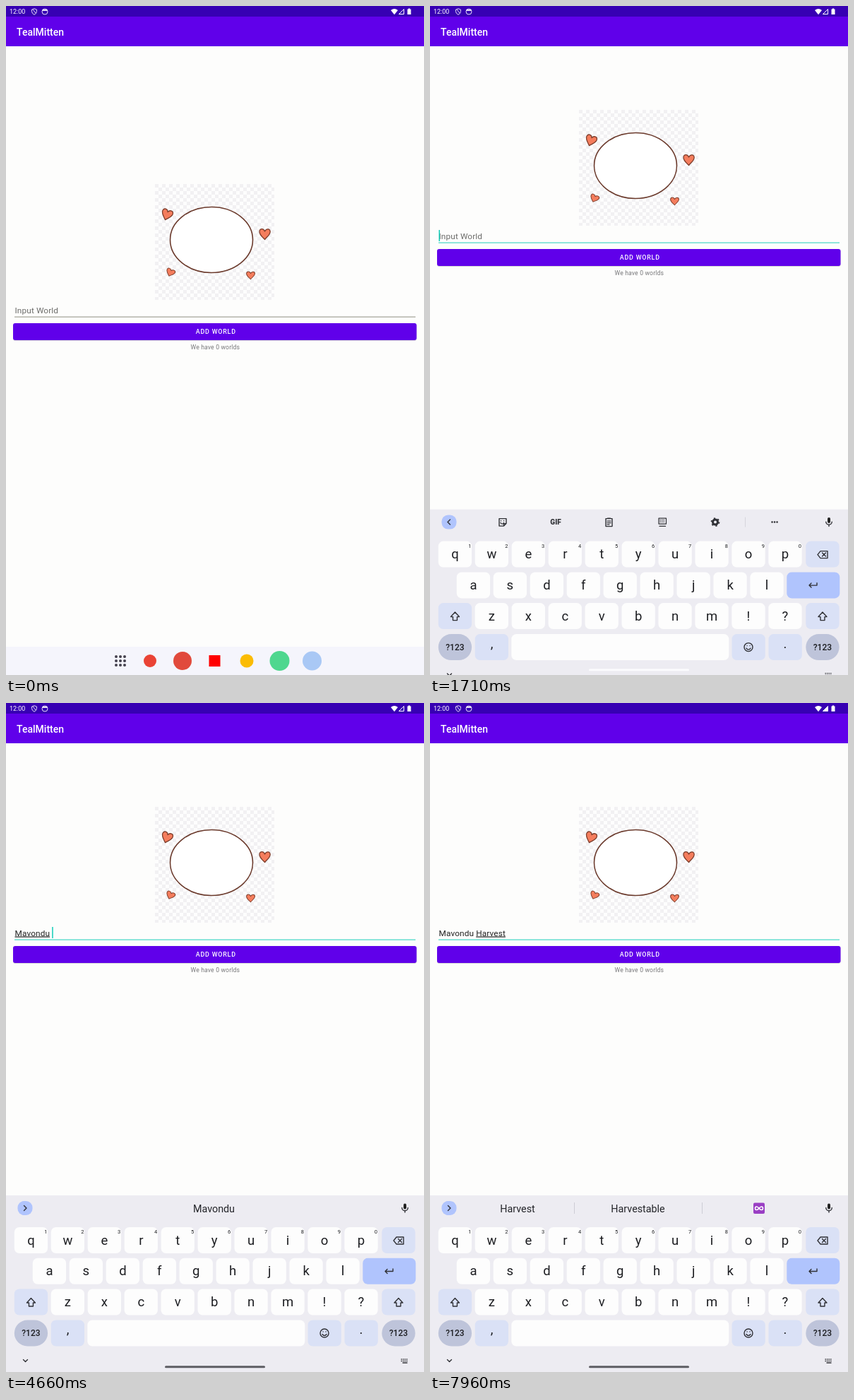
Recreate the animation shown at these times as an HTML page. Size 592 by 947 pixels, loop 8000 ms.

```html
<!DOCTYPE html>
<html lang="en">
<head>
<meta charset="utf-8">
<title>Add a world</title>
<style>
html, body { margin: 0; width: 100%; height: 100%; overflow: hidden; background: #fdfdfc; }
svg { display: block; width: 592px; height: 947px; font-family: Roboto, sans-serif; }
.mid { text-anchor: middle; }
.key { font-size: 18.5px; fill: #1d1e22; text-anchor: middle; }
.line { fill: none; stroke: #303136; stroke-width: 1.4; stroke-linecap: round; stroke-linejoin: round; }
#entry, #hint { white-space: pre; font-size: 11.84px; letter-spacing: .12px; }
</style>
</head>
<body>
<svg viewBox="0 0 592 947" xmlns="http://www.w3.org/2000/svg">
  <defs>
    <pattern id="check" width="10" height="10" patternUnits="userSpaceOnUse" x="211" y="252">
      <rect width="10" height="10" fill="#fdfdfd"/>
      <path d="M0 0h5v5h-5zM5 5h5v5h-5z" fill="#f2f1f3"/>
    </pattern>
    <path id="heart" d="M0 8C-4 4-8 1-7.5-3.500C-7-8-1.500-8 0-3.500C2-8 7.500-7.500 7.700-3C7.500 2 3 4 0 8Z"
      fill="#f47d5d" stroke="#7d3d2b" stroke-width="1.3" stroke-linejoin="round"/>
  </defs>
  <rect width="592" height="947" fill="#fdfdfc"/>

  <g id="content">
    <rect x="211" y="252" width="169" height="164" fill="url(#check)"/>
    <ellipse cx="291" cy="331" rx="58.5" ry="46.500" fill="#fff" stroke="#6b3a2c" stroke-width="1.6"/>
    <use href="#heart" transform="translate(228 295) rotate(18)"/>
    <use href="#heart" transform="translate(366.500 322.500)"/>
    <use href="#heart" transform="translate(233 377) rotate(22) scale(.8 .7)"/>
    <use href="#heart" transform="translate(346.500 381) scale(.78 .72)"/>
    <text id="hint" x="12.500" y="434.500" fill="#6c6c6a">Input World</text>
    <text id="entry" x="12.500" y="434.500" fill="#222"><tspan></tspan><tspan text-decoration="underline"></tspan><tspan></tspan></text>
    <rect id="rule" x="12" y="439.600" width="568" height="1"/>
    <rect id="caret" y="422" width="1.500" height="16" fill="#12cdb8"/>
    <rect x="10" y="450" width="571.500" height="24" rx="3" fill="#000" opacity=".15"/>
    <rect x="10" y="449" width="571.500" height="24" rx="3" fill="#6000ea"/>
    <text class="mid" x="297.300" y="464.200" font-size="8.88" font-weight="500" letter-spacing=".79" fill="#fff">ADD WORLD</text>
    <text class="mid" x="296.300" y="486.200" font-size="8.6" letter-spacing=".17" fill="#77777a">We have 0 worlds</text>
  </g>

  <rect width="592" height="57" fill="#6000ea"/>
  <rect width="592" height="15" fill="#3700b3"/>
  <text x="15" y="41.800" font-size="14" font-weight="500" fill="#fff">TealMitten</text>
  <text x="5" y="11.200" font-size="9" fill="#fff">12:00</text>
  <g fill="none" stroke="#e4dcf6" stroke-width="1">
    <path d="M40 3.800l3.500 1.300v2.500q0 3-3.500 4.700q-3.500-1.700-3.500-4.700v-2.500zM38 5l4 5"/>
    <circle cx="55" cy="8" r="4"/>
    <path d="M51.500 6h7" stroke-width="2"/>
  </g>
  <g fill="#fff">
    <path d="M545 6Q550 2 555 6L550 12.200Z"/>
    <path d="M556.500 11.500L563.500 4.500V11.500Z" fill="none" stroke="#fff"/>
    <path id="signal" d="M556.500 11.500L563.500 4.500V11.500Z"/>
    <path d="M568.500 4.500h1.300v-1h2.400v1h1.300v7.500h-5z"/>
  </g>

  <g id="dock">
    <rect y="907" width="592" height="40" fill="#f5f5fc"/>
    <g id="dots" fill="#45424f"></g>
    <circle cx="204" cy="927" r="9" fill="#ea4335"/>
    <circle cx="250" cy="927" r="13" fill="#e14a3c"/>
    <rect x="287.500" y="919" width="16" height="16" fill="#f00"/>
    <circle cx="341" cy="927" r="9.500" fill="#fbbc04"/>
    <circle cx="387.500" cy="927" r="14" fill="#4fd78f"/>
    <circle cx="433.500" cy="927" r="13.500" fill="#a9c8f5"/>
  </g>

  <g id="board">
    <rect y="697" width="592" height="260" fill="#edecf2"/>
    <g id="keys"></g>
    <rect x="16.500" y="705" width="21" height="20" rx="9" fill="#b0c4fd"/>
    <path id="toggle" class="line"/>
    <g id="tools">
      <g class="line">
        <path d="M98 710h10v7l-3.500 3.500h-6.500zM108 717h-3.500v3.500M100 716q2.500 3 4.500 0M100.500 713.200h.1M104.500 713.200h.1"/>
        <path d="M249 710h9v11h-9zM251.500 709.500h4M251 713.500h5M251 716h5M251 718.500h3"/>
        <path d="M324 709.500h10.500v8h-10.500zM325 720.800h8.500" stroke-width="1.2"/>
        <path d="M326 712h7M326 714.500h7" stroke-dasharray=".5 2"/>
        <circle cx="404" cy="715" r="3.500" stroke-width="3"/>
        <circle cx="404" cy="715" r="5.500" stroke-width="1.800" stroke-dasharray="2.200 3.560" stroke-linecap="butt"/>
        <path d="M484.500 715h.1M488 715h.1M491.500 715h.1" stroke-width="2.500"/>
      </g>
      <text class="mid" x="178" y="718.800" font-size="10" font-weight="900" fill="#303136">GIF</text>
      <path d="M446.500 708v14" stroke="#d5d5dc"/>
    </g>
    <g id="strip" class="mid" font-size="14.3" fill="#24252a">
      <path id="bars" d="M204.500 707v16M385.500 707v16" stroke="#cdcdd5"/>
      <text x="124" y="720.500"></text>
      <text x="294.500" y="720.500"></text>
      <text x="465" y="720.500"></text>
      <g id="loop">
        <rect x="458" y="707.500" width="16" height="15.500" rx="2" fill="#9a3fc4"/>
        <path d="M466 715.200C463.500 712 460.500 712.500 460.500 715.200S463.500 718.500 466 715.200S471.500 712.500 471.500 715.200S468.500 718.500 466 715.200" fill="none" stroke="#fff" stroke-width="1.500"/>
      </g>
    </g>
    <rect x="563" y="708.500" width="4" height="8" rx="2" fill="#222"/>
    <path class="line" d="M560.800 714.500a4.200 4.200 0 0 0 8.400 0M565 718.800v2.200"/>
    <path class="line" d="M24.500 929.500l3 3l3-3" stroke-width="1"/>
    <path class="line" d="M560 929h10M560 931.500h10" stroke-dasharray=".5 2"/>
    <path class="line" d="M562 934h6"/>
  </g>
  <rect id="handle" x="225" y="938.200" width="142" height="3" rx="1.500"/>
</svg>

<script>
const LOOP = 8000, FOCUS = 1536, RISE = 290, LAG = 55;
const $ = id => document.getElementById(id);
const show = (el, on) => el.setAttribute("visibility", on ? "inherit" : "hidden");

// time, settled text, underlined word, trailing text
const typed = [
  [0, "", "", ""],
  [2580, "", "M", ""],
  [2990, "", "Ma", ""],
  [3410, "", "Mav", ""],
  [4500, "", "Mavondu", " "],
  ...[..."Harvest"].map((c, i) => [4740 + i * 210, "Mavondu ", "Harvest".slice(0, i + 1), ""])
];
const hints = [
  [2580 + LAG, "M", "My", "Me"],
  [2990 + LAG, "Ma", "Mavondu", "MA"],
  [3410 + LAG, "Mav", "Mavondu", "MAV"],
  [4500, "", "Mavondu", ""],
  [4740 + LAG, "H", "He", "Have"],
  [4950 + LAG, "Ha", "Have", "Has"],
  [5160 + LAG, "Har", "Hard", "Harm"],
  [5370, "Harv", "Harvest", "Harvested"],
  [5790, "Harve", "Harvest", "Harvested"],
  [6000, "Harvest", "Harvestable", ""]
];
const last = (list, t) => list.filter(e => e[0] <= t).pop();

function buildKeys() {
  const W = 47.3, P = 51.95, H = 37;
  const tops = [742, 785.8, 829.5, 873.5];
  const pale = "#dae1f6", grey = "#bec4da", white = "#fdfdfd";
  let out = "";
  const cap = (x, row, w, fill, r = 7) =>
    out += `<rect x="${x}" y="${tops[row]}" width="${w}" height="${H}" rx="${r}" fill="${fill}"/>`;
  const label = (x, y, s, more = "") => out += `<text class="key" x="${x}" y="${y}" ${more}>${s}</text>`;
  const icon = d => out += `<path class="line" d="${d}"/>`;
  const letters = (s, x0, row) => [...s].forEach((c, i) => {
    const x = x0 + i * P;
    cap(x, row, W, white);
    label(x + W / 2, tops[row] + 24.6, c);
    if (!row) label(x + 44.500, 751, (i + 1) % 10, 'style="font-size:7.5px"');
  });
  letters("qwertyuiop", 11.8, 0);
  letters("asdfghjkl", 37.8, 1);
  letters("zxcvbnm!?", 63.7, 2);
  cap(532.3, 0, W, pale);
  icon("M549 761l4-5h10v10h-10zM555.500 758.500l5 5M560.500 758.500l-5 5");
  cap(505.3, 1, 75, "#b0c4fd");
  icon("M548 801v3.500h-11M540 801.500l-3 3l3 3");
  for (const x of [11.8, 532.3]) {
    const c = x + W / 2;
    cap(x, 2, W, pale);
    icon(`M${c} 842.500l6 6.500h-3v5h-6v-5h-3z`);
    cap(x, 3, W, grey, 18.5);
    label(c, 896, "?123", 'style="font-size:12px;font-weight:500"');
  }
  cap(63.7, 3, W, pale);
  label(87.500, 893, ",");
  cap(115.3, 3, 308, white);
  cap(427.5, 3, W, pale);
  out += '<circle class="line" cx="451" cy="892" r="6"/>';
  icon("M448 893.500q3 4 6 0M449 890h.1M453 890h.1");
  cap(479.5, 3, W, pale);
  label(503, 893, ".");
  $("keys").innerHTML = out;
}

function buildDots() {
  let out = "";
  for (let i = 0; i < 9; i++)
    out += `<circle cx="${156 + i % 3 * 6}" cy="${921 + (i / 3 | 0) * 6}" r="2"/>`;
  $("dots").innerHTML = out;
}

function draw(t) {
  const focus = t >= FOCUS;
  const u = Math.min(1, Math.max(0, (t - FOCUS) / RISE));
  $("content").setAttribute("transform", `translate(0 ${focus ? -105 : 0})`);
  $("board").setAttribute("transform", `translate(0 ${250 * (1 - u) ** 3})`);
  show($("board"), focus);
  show($("dock"), !focus);
  show($("handle"), focus);
  $("handle").setAttribute("fill", t < FOCUS + RISE ? "#fbfbfd" : "#5d5d63");
  $("rule").setAttribute("fill", focus ? "#1fd0ba" : "#8f8f82");
  show($("signal"), t >= 7160);

  const now = last(typed, t);
  const spans = $("entry").children;
  for (let i = 0; i < 3; i++) spans[i].textContent = now[i + 1];
  show($("hint"), !now[2]);
  const since = t - Math.max(now[0], FOCUS);
  show($("caret"), focus && since % 1000 < 500);
  const len = now[2] ? $("entry").getComputedTextLength() : 0;
  $("caret").setAttribute("x", 12.5 + len);

  const tip = last(hints, t);
  show($("tools"), !tip);
  show($("strip"), tip);
  $("toggle").setAttribute("d", tip ? "M25.500 711.500l3.500 3.500l-3.500 3.500" : "M28.500 711.500l-3.500 3.500l3.500 3.500");
  const words = $("strip").querySelectorAll("text");
  words.forEach((w, i) => w.textContent = tip ? tip[i + 1] : "");
  show($("bars"), tip && tip[1]);
  show($("loop"), tip && tip[0] === 6000);
}

buildKeys();
buildDots();
const start = performance.now();
function tick() {
  draw((performance.now() - start) % LOOP);
  requestAnimationFrame(tick);
}
tick();
</script>
</body>
</html>
```
